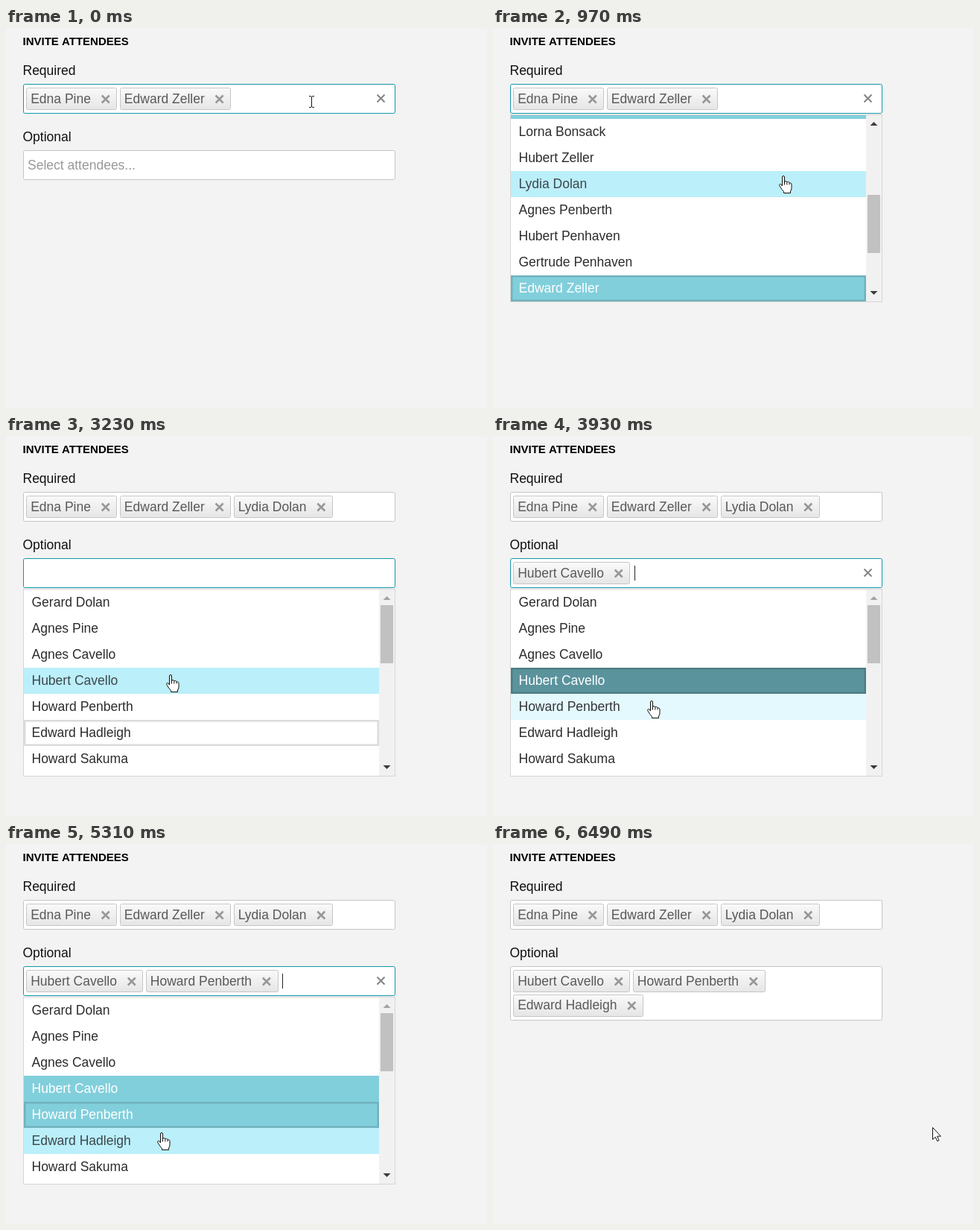
Write an HTML page with a canvas that moves like this. It is 646 by 510 pixels and loops after 6.95 s.

```html
<!DOCTYPE html>
<html lang="en">
<head>
<meta charset="utf-8">
<title>Invite attendees</title>
<style>
html, body { margin: 0; width: 100%; height: 100%; overflow: hidden; background: #f3f3f3; }
canvas { display: block; width: 646px; height: 510px; }
</style>
</head>
<body>
<canvas id="stage" width="646" height="510"></canvas>
<script>
const ctx = document.getElementById('stage').getContext('2d');
const LOOP = 6950, ROW = 35, FADE = 150;
const FAMILY = '"Liberation Sans", Arial, sans-serif';
const FONT = '17.5px ' + FAMILY;

// Moments of the user's actions, in ms
const T = { reqFocus: 280, pick1: 1350, reqBlur: 2050, optFocus: 2690,
            pick2: 3610, pick3: 4380, pick4: 5390, optBlur: 6225 };

const WHITE = [255, 255, 255], HOVER = [187, 239, 249],
      CHOSEN = [130, 207, 220], CHOSEN_HOVER = [91, 146, 156],
      INK = [44, 44, 44], INK_HOVER = [62, 70, 78];

const required = [
  { name: 'Edna Pine', at: 0 },
  { name: 'Edward Zeller', at: 0 },
  { name: 'Lydia Dolan', at: T.pick1 }
];
const optional = [
  { name: 'Hubert Cavello', at: T.pick2 },
  { name: 'Howard Penberth', at: T.pick3 },
  { name: 'Edward Hadleigh', at: T.pick4 }
];

const lists = [
  {
    rows: ['Edna Pine', 'Lorna Bonsack', 'Hubert Zeller', 'Lydia Dolan', 'Agnes Penberth',
           'Hubert Penhaven', 'Gertrude Penhaven', 'Edward Zeller'],
    chosen: { 0: 0, 7: 0, 3: T.pick1 },
    focus: [[0, 7], [T.pick1, 3]],
    open: 290, close: 1370, scroll: 30, thumb: 107,
    top: () => 116
  },
  {
    rows: ['Gerard Dolan', 'Agnes Pine', 'Agnes Cavello', 'Hubert Cavello', 'Howard Penberth',
           'Edward Hadleigh', 'Howard Sakuma'],
    chosen: { 3: T.pick2, 4: T.pick3, 5: T.pick4 },
    focus: [[0, 5], [T.pick2, 3], [T.pick3, 4], [T.pick4, 5]],
    open: T.optFocus, close: T.optBlur, scroll: 0, thumb: 21,
    top: t => t < T.pick4 ? 205 : 237
  }
];

// Pointer stops: time, x, y
const path = [
  [0, 410, 99], [340, 410, 99], [830, 390, 198], [1690, 390, 198],
  [1990, 374, 247], [2080, 374, 247], [2340, 354, 174], [2740, 354, 174],
  [3130, 221, 320], [3720, 221, 320], [3950, 212.5, 356], [4460, 212.5, 356],
  [4760, 209, 386.5], [5450, 209, 386.5], [5900, 590, 380], [LOOP, 590, 380]
];

const HAND = new Path2D('M-1.5 14V2Q-1.5.5 0 .5 1.5.5 1.5 2V9Q1.8 7.5 3.3 7.5 4.8 7.8 4.8 9.3 5.2 8.3 6.6 8.5 8 8.8 8 10.3 8.6 9.6 9.8 10 11 10.5 11 12V17Q11 19 9.5 21V23.5H.5V21.5Q-2.5 18.5-5 14-6 12-4.6 11.4-3.2 11-1.5 14Z');
const KNUCKLES = new Path2D('M1.5 9V12.5M4.8 9.3V12.5M8 10.3V12.5');
const ARROW = new Path2D('M.5.5V16.6L4.2 13.2 6.7 18.8 9 17.8 6.5 12.2H11.4Z');
const BEAM = new Path2D('M-3 -7.5H-1L.5 -6.5 2 -7.5H4M.5 -6.5V6.5M-3 7.5H-1L.5 6.5 2 7.5H4');

const clamp = v => Math.max(0, Math.min(1, v));
const mix = (a, b, w) => a.map((v, i) => v + (b[i] - v) * w);
const rgb = c => `rgb(${c.map(Math.round)})`;

function pointer(t) {
  let i = 1;
  while (i < path.length - 1 && path[i][0] < t) i++;
  const a = path[i - 1], b = path[i];
  const u = clamp((t - a[0]) / (b[0] - a[0])), s = u * u * (3 - 2 * u);
  return { x: a[1] + (b[1] - a[1]) * s, y: a[2] + (b[2] - a[2]) * s };
}

function openness(list, t) {
  if (t < list.open || t >= list.close + 110) return 0;
  if (t >= list.close) return 1 - clamp((t - list.close) / 110);
  return 1 - Math.pow(1 - clamp((t - list.open) / 200), 3);
}

const optHeight = t => t < T.pick4 ? 40 : 73;

// What the pointer is over: a list row, a field or nothing
function target(t) {
  const p = pointer(t);
  for (const list of lists) {
    const k = openness(list, t), top = list.top(t);
    if (k && p.x > 23 && p.x < 523 && p.y > top && p.y < top + 252 * k) {
      if (p.x > 501) return { kind: 'bar' };
      const y = p.y - top - 1 + list.scroll + 252 * (1 - k);
      return { kind: 'row', list, row: Math.floor(y / ROW) };
    }
  }
  if (p.x > 23 && p.x < 523) {
    if (p.y > 75 && p.y < 115) return { kind: 'field', field: 0 };
    if (p.y > 164 && p.y < 164 + optHeight(t)) return { kind: 'field', field: 1 };
  }
  return { kind: 'page' };
}

// Hover strength of each row, from the recent pointer trail
function hoverWeights(list, t) {
  const w = list.rows.map(() => 0), n = 15;
  for (let i = 0; i < n; i++) {
    const hit = target(t - (i + 0.5) * FADE / n);
    if (hit.list === list && hit.row in w) w[hit.row] += 1 / n;
  }
  return w;
}

function text(s, x, y, color, font = FONT) {
  ctx.font = font;
  ctx.fillStyle = color;
  ctx.fillText(s, x, y);
}

function box(x, y, w, h, fill, border) {
  ctx.beginPath();
  ctx.roundRect(x + 0.5, y + 0.5, w - 1, h - 1, 2);
  ctx.fillStyle = fill;
  ctx.fill();
  ctx.lineWidth = 1;
  ctx.strokeStyle = border;
  ctx.stroke();
}

function cross(x, y, color, width) {
  const r = 5;
  ctx.beginPath();
  ctx.moveTo(x - r, y - r); ctx.lineTo(x + r, y + r);
  ctx.moveTo(x + r, y - r); ctx.lineTo(x - r, y + r);
  ctx.lineWidth = width;
  ctx.strokeStyle = color;
  ctx.stroke();
}

function drawChip(name, x, y) {
  ctx.font = FONT;
  const end = x + ctx.measureText(name).width + 41.7;
  const left = Math.round(x), top = Math.round(y);
  const shade = ctx.createLinearGradient(0, top, 0, top + 30);
  shade.addColorStop(0, '#fafafa');
  shade.addColorStop(1, '#e5e5e5');
  box(left, top, Math.round(end) - left, 30, shade, '#c6c6c6');
  text(name, x + 6.2, Math.floor(y + 21), '#595959');
  cross(end - 15.7, y + 15.5, '#979797', 2.5);
  return end;
}

function drawField(y, h, items, t, s) {
  box(23, y, 500, h, '#fff', s.focus || s.hover ? '#1296a9' : '#c5c5c5');
  const shown = items.filter(c => t >= c.at);
  let x = 27, line = y + 5, end = 24;
  ctx.font = FONT;
  for (const c of shown) {
    if (x + ctx.measureText(c.name).width + 41.7 > 495) { x = 27; line += 32.5; }
    end = drawChip(c.name, x, line);
    x = end + 3.2;
  }
  if (!shown.length && !s.focus) text('Select attendees...', 29, y + 26, s.hover ? '#777' : '#999');
  if (shown.length && (s.focus || s.hover)) cross(503.5, y + 19.5, '#858585', 2);
  if (s.caret) {
    ctx.fillStyle = '#222';
    ctx.fillRect(Math.round(end + 5.5), Math.round(line + 5), 1, 20);
  }
}

function triangle(x, y, dir, color) {
  ctx.beginPath();
  ctx.moveTo(x - 5, y - 2.5 * dir);
  ctx.lineTo(x + 5, y - 2.5 * dir);
  ctx.lineTo(x, y + 2.5 * dir);
  ctx.fillStyle = color;
  ctx.fill();
}

function drawList(list, t) {
  const k = openness(list, t);
  if (!k) return;
  const top = list.top(t), weights = hoverWeights(list, t);
  const focus = list.focus.filter(f => t >= f[0]).pop()[1];
  ctx.save();
  ctx.beginPath();
  ctx.rect(23, top, 500, 252);
  ctx.clip();
  ctx.translate(0, top - Math.round(252 * (1 - k)));
  ctx.fillStyle = '#d6d6d6';
  ctx.fillRect(23, 0, 500, 252);
  ctx.fillStyle = '#fff';
  ctx.fillRect(24, 1, 477, 250);
  ctx.fillStyle = '#f1f1f1';
  ctx.fillRect(501, 1, 21, 250);
  ctx.fillStyle = '#c1c1c1';
  ctx.fillRect(503, 1 + list.thumb, 17, 78);
  triangle(511.5, 12.5, -1, list.scroll ? '#453a3d' : '#a3a3a3');
  triangle(511.5, 239.5, 1, '#3c3a3b');

  ctx.beginPath();
  ctx.rect(24, 1, 477, 250);
  ctx.clip();
  list.rows.forEach((name, i) => {
    const y = 1 + i * ROW - list.scroll, w = weights[i];
    const chosen = t >= list.chosen[i];
    const back = chosen ? mix(CHOSEN, CHOSEN_HOVER, clamp(w * 1.65)) : mix(WHITE, HOVER, w);
    ctx.fillStyle = rgb(back);
    ctx.fillRect(24, y, 477, ROW);
    if (i === focus) {
      ctx.strokeStyle = 'rgba(0,0,0,.14)';
      ctx.lineWidth = 2.5;
      ctx.strokeRect(25.25, y + 1.25, 474.5, ROW - 2.5);
    }
    text(name, 34.5, y + 23, chosen ? '#fff' : rgb(mix(INK, INK_HOVER, w)));
  });
  ctx.restore();
}

function drawPointer(t, hit) {
  const p = pointer(t);
  ctx.save();
  ctx.translate(Math.round(p.x), Math.round(p.y));
  ctx.lineWidth = 1;
  ctx.lineJoin = 'round';
  ctx.strokeStyle = '#111';
  ctx.fillStyle = '#fff';
  if (hit.kind === 'field') {
    ctx.stroke(BEAM);
  } else {
    const shape = hit.kind === 'row' ? HAND : ARROW;
    ctx.fill(shape);
    ctx.stroke(shape);
    if (shape === HAND) ctx.stroke(KNUCKLES);
  }
  ctx.restore();
}

function draw(t) {
  const within = (a, b) => t >= a && t < b;
  const hit = target(t);
  ctx.fillStyle = '#f3f3f3';
  ctx.fillRect(0, 0, 646, 510);
  text('INVITE ATTENDEES', 22.5, 23, '#000', 'bold 15px ' + FAMILY);
  text('Required', 22.5, 63, '#111');
  text('Optional', 22.5, 152, '#111');
  drawField(75, 40, required, t, {
    focus: within(T.reqFocus, T.reqBlur),
    hover: hit.field === 0,
    caret: within(T.reqFocus + 20, 890) || within(T.pick1, T.reqBlur)
  });
  drawField(164, optHeight(t), optional, t, {
    focus: within(T.optFocus, T.optBlur),
    hover: hit.field === 1,
    caret: within(T.optFocus, 3210) || within(T.pick2, T.optBlur)
  });
  lists.forEach(list => drawList(list, t));
  drawPointer(t, hit);
}

const start = performance.now();
function tick() {
  draw((performance.now() - start) % LOOP);
  requestAnimationFrame(tick);
}
tick();
</script>
</body>
</html>
```
